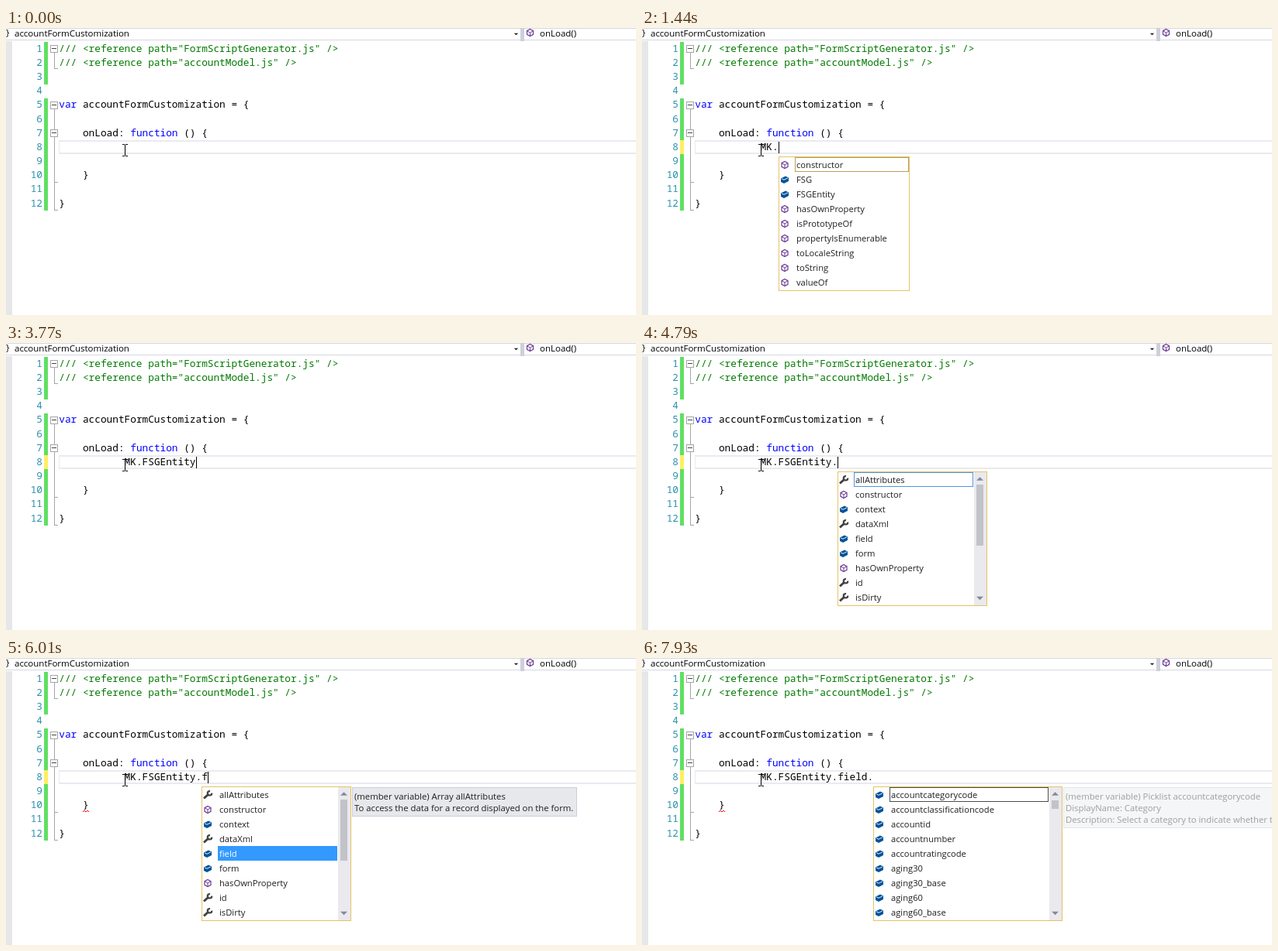
Animation, 812 px wide and 371 px high, one loop 8 s. Source, as an HTML page with a canvas:

```html
<!DOCTYPE html>
<html lang="en">
<head>
<meta charset="utf-8">
<title>Code completion</title>
<style>
html, body { margin: 0; width: 100%; height: 100%; overflow: hidden; background: #fff; }
canvas { display: block; }
</style>
</head>
<body>
<canvas id="stage" width="812" height="371"></canvas>
<script>
const ctx = document.getElementById('stage').getContext('2d', { alpha: false });
const LOOP = 8000, BLINK = 530;
const CODE_X = 68.3, CHAR = 7.662, PITCH = 18.18, EDIT_COL = 11;
const CODE_FONT = '500 12.77px "Noto Sans Mono", monospace';
const uiFont = size => `${size}px "Open Sans", "Noto Sans", sans-serif`;
const HEAD_FONT = uiFont(11.5), LIST_FONT = uiFont(11.2), TIP_FONT = uiFont(11.3);
const INK = '#000', BLUE = '#0000ff', GREEN = '#007a00', TEAL = '#2b91af', RULE = '#a5a5a5';

// [line, column, text, colour]
const CODE = [
  [1, 0, '/// <reference path="FormScriptGenerator.js" />', GREEN],
  [2, 0, '/// <reference path="accountModel.js" />', GREEN],
  [5, 0, 'var', BLUE],
  [5, 4, 'accountFormCustomization = {', INK],
  [7, 4, 'onLoad:', INK],
  [7, 12, 'function', BLUE],
  [7, 21, '() {', INK],
  [10, 4, '}', INK],
  [12, 0, '}', INK]
];

// Item prefixes: m = method, b = field, w = property
const LISTS = {
  root: {
    x: 176, w: 169, focus: '#b79f52',
    items: ['m constructor', 'b FSG', 'b FSGEntity', 'm hasOwnProperty', 'm isPrototypeOf',
      'm propertyIsEnumerable', 'm toLocaleString', 'm toString', 'm valueOf']
  },
  entity: {
    x: 252, w: 193, focus: '#4f94e6', thumb: [183, 79],
    items: ['w allAttributes', 'm constructor', 'b context', 'w dataXml', 'b field', 'b form',
      'm hasOwnProperty', 'w id', 'w isDirty']
  },
  field: {
    x: 298, w: 244, focus: '#4a4a4a', thumb: [184, 11],
    items: ['b accountcategorycode', 'b accountclassificationcode', 'b accountid', 'b accountnumber',
      'b accountratingcode', 'b aging30', 'b aging30_base', 'b aging60', 'b aging60_base']
  }
};

// [time, typed text, open list, selected row]; row -1 means focused but not selected
const EDITS = [
  [0, ''],
  [310, 'M'],
  [530, 'MK'],
  [1440, 'MK.', 'root', -1],
  [2450, 'MK.f', 'root', 1],
  [2910, 'MK.fs', 'root', 1],
  [3070, 'MK.fsg', 'root', 1],
  [3450, 'MK.fsg', 'root', 2],
  [3610, 'MK.FSGEntity'],
  [4610, 'MK.FSGEntity.'],
  [4790, 'MK.FSGEntity.', 'entity', -1],
  [6010, 'MK.FSGEntity.f', 'entity', 4],
  [6850, 'MK.FSGEntity.field'],
  [7160, 'MK.FSGEntity.field.'],
  [7310, 'MK.FSGEntity.field.', 'field', -1]
];

const ERRORS = [[1790, 2600], [5180, 6200], [7470, LOOP]];
const MATCH = [2600, 2910];

const TIPS = [
  { from: 5420, to: 6085, x: 446, w: 290, lines: [
    '(member variable) Array allAttributes',
    'To access the data for a record displayed on the form.'] },
  { from: 7770, to: LOOP, x: 543, w: 330, lines: [
    '(member variable) Picklist accountcategorycode',
    'DisplayName: Category',
    'Description: Select a category to indicate whether the'] }
];

const within = (t, [from, to]) => t >= from && t < to;

function rect(x, y, w, h, color) {
  ctx.fillStyle = color;
  ctx.fillRect(x, y, w, h);
}

function frame(x, y, w, h, color) {
  ctx.strokeStyle = color;
  ctx.lineWidth = 1;
  ctx.strokeRect(x + 0.5, y + 0.5, w - 1, h - 1);
}

function poly(points, fill, stroke, width = 1) {
  ctx.beginPath();
  points.forEach(([x, y]) => ctx.lineTo(x, y));
  if (fill) {
    ctx.closePath();
    ctx.fillStyle = fill;
    ctx.fill();
  }
  if (stroke) {
    ctx.strokeStyle = stroke;
    ctx.lineWidth = width;
    ctx.stroke();
  }
}

function label(text, x, y, color, font) {
  ctx.font = font;
  ctx.fillStyle = color;
  ctx.fillText(text, x, y);
}

const lineTop = n => Math.round(18 + (n - 1) * PITCH);
const baseline = n => Math.floor(31.1 + (n - 1) * PITCH);
const colX = col => CODE_X + col * CHAR;
const code = (line, col, text, color) => label(text, colX(col), baseline(line), color, CODE_FONT);

function cube(x, y) {
  const c = '#6b3a94';
  poly([[x, y - 4.5], [x + 4, y - 2.3], [x + 4, y + 2.3], [x, y + 4.5],
    [x - 4, y + 2.3], [x - 4, y - 2.3], [x, y - 4.5]], '#fff', c, 1.2);
  poly([[x - 4, y - 2.3], [x, y], [x + 4, y - 2.3]], null, c);
  poly([[x, y], [x, y + 4.5]], null, c);
}

function brick(x, y) {
  poly([[x - 5, y - 1.5], [x + 1, y - 4.5], [x + 5, y - 2.5], [x + 5, y + 2], [x - 1, y + 5], [x - 5, y + 3]], '#00539c');
  poly([[x - 4, y - 1.2], [x - 1, y + 0.3], [x + 4, y - 2.2]], null, '#fff', 0.9);
}

function wrench(x, y) {
  poly([[x - 5, y + 4.5], [x + 1, y - 1]], null, '#424242', 3);
  ctx.beginPath();
  ctx.arc(x + 2.5, y - 2.2, 2.7, -0.1, 4.9);
  ctx.lineWidth = 2.2;
  ctx.stroke();
}

const ICONS = { m: cube, b: brick, w: wrench };

function arrow(x, y, size, dir, color) {
  poly([[x - size, y - dir * size / 2], [x + size, y - dir * size / 2], [x, y + dir * size / 2]], color);
}

function header() {
  rect(0, 0, 812, 1, '#d6d8e0');
  rect(0, 15, 812, 1, '#d6d8e0');
  rect(663, 0, 5, 17, '#cdd0da');
  label('}', 0, 10, INK, HEAD_FONT);
  label('accountFormCustomization', 11, 11, INK, HEAD_FONT);
  arrow(657.5, 8, 2.7, 1, '#1e1e1e');
  cube(675.5, 6);
  label('onLoad()', 688, 11, INK, HEAD_FONT);
}

function foldBox(y) {
  rect(57, y, 10, 10, '#fff');
  frame(57, y, 10, 10, RULE);
  rect(59, y + 4, 6, 1, '#444');
}

function outline() {
  rect(62, 32, 1, 21, RULE);
  rect(62, 105, 1, 131, RULE);
  [52, 199, 235].forEach(y => rect(62, y, 5, 1, RULE));
  [22, 95, 131].forEach(foldBox);
}

function editor(dirty) {
  rect(0, 17, 8, 354, '#e6e7e8');
  rect(49, 18, 5, 55, '#5fe063');
  rect(49, lineTop(5), 5, lineTop(13) - lineTop(5), '#5fe063');
  if (dirty) rect(49, 145, 5, 18, '#ffee62');

  ctx.textAlign = 'right';
  for (let n = 1; n <= 12; n++) label(n, 47, baseline(n), TEAL, CODE_FONT);
  ctx.textAlign = 'left';

  outline();
  const edge = '#eaeaf2';
  rect(68, 145, 744, 2, edge);
  rect(68, 161, 744, 2, edge);
  rect(68, 145, 1, 18, edge);
  CODE.forEach(part => code(...part));
}

function pointer() {
  rect(153, 151, 1, 14, INK);
  [150, 165].forEach(y => {
    rect(150, y, 3, 1, INK);
    rect(154, y, 3, 1, INK);
  });
}

function squiggle() {
  const points = [];
  for (let x = 99; x <= 107; x += 2) points.push([x, x % 4 === 3 ? 199 : 197]);
  poly(points, null, '#f00000');
}

function scrollbar(right, [top, height]) {
  rect(right - 17, 167, 16, 172, '#e9e9ee');
  rect(right - 14, top, 9, height, '#c2c3c9');
  arrow(right - 9.5, 175.5, 4.5, -1, '#868999');
  arrow(right - 9.5, 330, 4.5, 1, '#868999');
}

function completion({ x, w, focus, thumb, items }, selected) {
  const rowEnd = x + w - (thumb ? 18 : 1);
  rect(x, 166, w, 174, '#fff');
  if (thumb) scrollbar(x + w, thumb);
  items.forEach((item, i) => {
    const y = 168 + i * 19, chosen = i === selected;
    if (chosen) rect(x + 21, y - 1, rowEnd - x - 21, 19, '#3399ff');
    ICONS[item[0]](x + 8, y + 9);
    label(item.slice(2), x + 23, y + 13, chosen ? '#fff' : '#1e1e1e', LIST_FONT);
  });
  if (selected < 0) frame(x + 21, 167, rowEnd - x - 21, 19, focus);
  frame(x, 166, w, 174, '#e5c365');
}

function tooltip({ from, to, x, w, lines }, t) {
  if (!within(t, [from, to])) return;
  const h = lines.length * 15 + 8;
  ctx.globalAlpha = Math.min(1, (t - from) / 400);
  rect(x, 167, w, h, '#e7e8ec');
  frame(x, 167, w, h, '#cccedb');
  lines.forEach((text, i) => label(text, x + 3, 183 + i * 15, '#1e1e1e', TIP_FONT));
  ctx.globalAlpha = 1;
}

function draw(now) {
  const t = now % LOOP;
  const [since, text, list, row] = EDITS.filter(e => e[0] <= t).pop();
  rect(0, 0, 812, 371, '#fff');
  header();
  editor(text);
  if (within(t, MATCH)) rect(176, 147, 8, 14, '#e0e0e0');
  code(8, EDIT_COL, text, INK);
  if (text && (t - since) % (2 * BLINK) < BLINK) {
    rect(Math.round(colX(EDIT_COL + text.length)), 147, 1, 15, INK);
  }
  if (ERRORS.some(span => within(t, span))) squiggle();
  pointer();
  if (list) completion(LISTS[list], row);
  TIPS.forEach(tip => tooltip(tip, t));
}

const start = performance.now();
function tick() {
  draw(performance.now() - start);
  requestAnimationFrame(tick);
}
tick();
</script>
</body>
</html>
```
